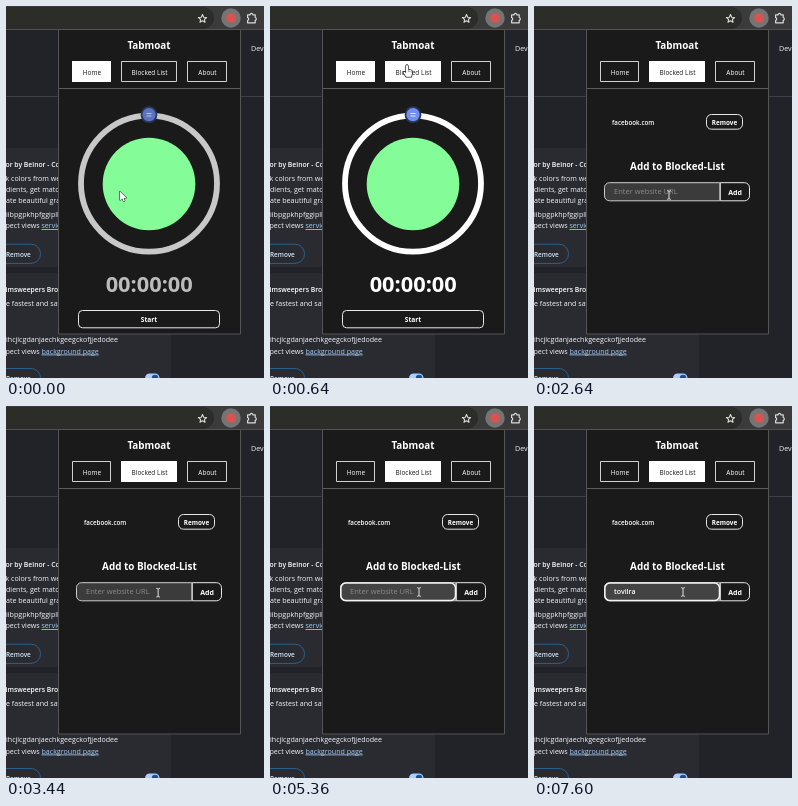
Write an HTML page with a canvas that moves like this. It is 258 by 372 pixels and loops after 8 s.

```html
<!DOCTYPE html>
<html lang="en">
<head>
<meta charset="utf-8">
<title>Site blocker popup</title>
<style>
html, body { margin: 0; width: 100%; height: 100%; overflow: hidden; background: #212329; }
canvas { display: block; width: 258px; height: 372px; }
</style>
</head>
<body>
<canvas id="stage"></canvas>
<script>
const W = 258, H = 372, LOOP = 8000;
const canvas = document.getElementById('stage');
const ctx = canvas.getContext('2d');
const dpr = window.devicePixelRatio || 1;
canvas.width = W * dpr;
canvas.height = H * dpr;

const FONT = '"Open Sans", "Noto Sans", sans-serif';
const INK = '#1a1a1a', WHITE = '#ffffff', EDGE = '#e8e8e8';
const PAGE_TEXT = '#f4f5f7', LINK = '#a4cbfb', PILL_EDGE = '#2b608c';

const PAGE_SWITCH = 1440, FOCUS = 3840;
const TYPED = 'tovilra';
const KEY_TIMES = [5840, 6000, 6160, 6800, 6960, 7120, 7360];

// Pointer path: time, x, y
const PATH = [
  [0, 114, 185], [640, 137, 59], [1920, 137, 59], [2640, 135, 189], [2800, 135, 190],
  [3200, 158, 188], [3600, 149, 186], [LOOP, 149, 186]
];

const clamp = v => Math.max(0, Math.min(1, v));
const ramp = (t, a, b) => clamp((t - a) / (b - a));
const ease = p => p * p * (3 - 2 * p);

function text(str, x, y, size, weight = 400, color = WHITE, align = 'left') {
  ctx.font = `${weight} ${size}px ${FONT}`;
  ctx.fillStyle = color;
  ctx.textAlign = align;
  ctx.fillText(str, x, y);
}

function pageText(str, y, x = 0) {
  text(str, x, y, 7.1, 500, PAGE_TEXT);
}

function rect(x, y, w, h, color) {
  ctx.fillStyle = color;
  ctx.fillRect(x, y, w, h);
}

function box(x, y, w, h, r, fill, stroke, line = 1) {
  ctx.beginPath();
  ctx.roundRect(x, y, w, h, r);
  if (fill) { ctx.fillStyle = fill; ctx.fill(); }
  if (stroke) { ctx.strokeStyle = stroke; ctx.lineWidth = line; ctx.stroke(); }
}

function disc(x, y, r, color) {
  ctx.beginPath();
  ctx.arc(x, y, r, 0, Math.PI * 2);
  ctx.fillStyle = color;
  ctx.fill();
}

function faded(alpha, draw) {
  ctx.save();
  ctx.globalAlpha *= alpha;
  draw();
  ctx.restore();
}

function shape(d, x, y, fill, stroke, line = 1) {
  const path = new Path2D(d);
  ctx.save();
  ctx.translate(x, y);
  ctx.lineJoin = 'round';
  if (stroke) { ctx.strokeStyle = stroke; ctx.lineWidth = line; ctx.stroke(path); }
  if (fill) { ctx.fillStyle = fill; ctx.fill(path); }
  ctx.restore();
}

function drawToolbar() {
  rect(0, 0, W, 23, '#3b3b3b');
  rect(0, 23, W, 1, '#505050');
  box(-20, 1, 228, 22, 11, '#2c2d29');
  ctx.beginPath();
  for (let i = 0; i < 10; i++) {
    const a = -Math.PI / 2 + i * Math.PI / 5, r = i % 2 ? 2 : 4.3;
    ctx.lineTo(196.5 + r * Math.cos(a), 12.8 + r * Math.sin(a));
  }
  ctx.closePath();
  ctx.lineJoin = 'round';
  ctx.lineWidth = 1.1;
  ctx.strokeStyle = '#dcdcdc';
  ctx.stroke();
  disc(225, 12, 9.7, '#747474');
  disc(225, 12, 4.8, '#d9534f');
  shape('M-4 -3H-1.5A1.4 1.4 0 0 1 1.3 -3H3.6V-.3A1.5 1.5 0 0 1 3.6 2.6V5H-4V2.7A1.5 1.5 0 0 0 -4 -.2Z',
    245.6, 11.8, null, '#dcdcdc', 1.2);
}

function pill(y) {
  box(-30, y, 64.5, 19.2, 9.6, null, PILL_EDGE);
  text('Remove', 0, y + 12.3, 6.4, 600, '#d3e6fc');
}

function linkRow(label, y) {
  pageText('pect views ', y, -0.5);
  const x = ctx.measureText('pect views ').width - 0.5;
  text(label, x, y, 7.1, 500, LINK);
  rect(x, y + 1, ctx.measureText(label).width, 0.8, LINK);
}

function drawPage() {
  rect(0, 23, W, H, '#212329');
  rect(0, 90, W, 1, '#3c3f45');
  pageText('Developer mode', 45.3, 245);

  box(-20, 142, 185, 119, 4, '#2a2b30');
  box(-20, 267, 185, 130, 4, '#2a2b30');

  text('or by Belnor - Color picker', -0.5, 161, 6.8, 600, WHITE);
  pageText('k colors from websites', 174.5, -0.5);
  pageText('dients, get matching', 186);
  pageText('ate beautiful gradients', 197);
  pageText('iibpgpkhpfggiplhk', 210.5);
  linkRow('service worker', 222);
  pill(238.2);

  text('imsweepers Browser', -0.5, 286, 6.8, 600, WHITE);
  pageText('e fastest and safest', 299.5);
  pageText('ihcjicgdanjaechkgeegckofjjedodee', 336);
  linkRow('background page', 347.5);
  pill(362.5);
  box(139, 367.5, 14.5, 9, 4.5, '#a8cdff');
  disc(149, 372, 3.2, '#1a4f94');
}

function navButton(label, x, w, lit) {
  box(x + 0.5, 55.5, w - 1, 20, 0, INK, '#d0d0d0');
  const mid = x + w / 2 + 0.5;
  if (lit < 1) text(label, mid, 69, 6.5, 500, WHITE, 'center');
  if (lit > 0) faded(lit, () => {
    rect(x, 55, w, 21, WHITE);
    text(label, mid, 69, 6.5, 400, INK, 'center');
  });
}

function drawTimer(t) {
  const fade = ramp(t, 0, 560);
  faded(0.76 + 0.24 * fade, () => {
    ctx.beginPath();
    ctx.arc(143, 177.6, 68, 0, Math.PI * 2);
    ctx.lineWidth = 5.8;
    ctx.strokeStyle = WHITE;
    ctx.stroke();
  });
  faded(0.71 + 0.29 * fade, () => text('00:00:00', 143.2, 285.8, 21.8, 700, WHITE, 'center'));
  disc(143, 108.7, 8.4, '#29385a');
  faded(0.68 + 0.32 * fade, () => {
    disc(143, 108.7, 6.6, '#718ff0');
    rect(140.5, 107, 5, 1, '#e2e9ff');
    rect(140.5, 109.5, 5, 1, '#e2e9ff');
  });
  disc(143, 178, 46.3, '#84fd98');
  box(72.5, 304.5, 141, 17.3, 4, INK, EDGE);
  text('Start', 143, 315.8, 6.6, 700, WHITE, 'center');
}

function drawList(t) {
  text('facebook.com', 78, 118.7, 6.25, 600);
  box(172.5, 108.5, 36, 14.7, 5, INK, EDGE);
  text('Remove', 190.5, 118.8, 6.4, 700, WHITE, 'center');
  text('Add to Blocked-List', 143.4, 163.7, 9.9, 700, WHITE, 'center');

  const focus = ramp(t, FOCUS - 80, FOCUS + 160);
  box(186.3, 176.7, 29.2, 18.1, [0, 5, 5, 0], INK, EDGE);
  text('Add', 201, 189, 7, 700, WHITE, 'center');
  box(70.5, 176.7, 115.3, 18.1, [5, 0, 0, 5], '#3b3b3b', '#cccccc');
  if (focus) faded(focus, () => box(70.9, 177, 114.6, 17.6, 5, '#434343', '#f4f4f4', 1.5));

  const count = KEY_TIMES.filter(k => t >= k).length;
  if (count) text(TYPED.slice(0, count), 80, 188, 7, 600);
  else text('Enter website URL', 80, 188.2, 7.5, 400, '#8a8a8a');
}

function drawPopup(t) {
  const listOpen = t >= PAGE_SWITCH;
  box(52.5, 23.5, 182, 304.5, 0, INK, '#555555');
  text('Tabmoat', 143, 42.5, 9.9, 700, WHITE, 'center');
  navButton('Home', 66, 39, listOpen ? 0 : 1);
  navButton('Blocked List', 115, 56, ramp(t, 440, 640));
  navButton('About', 181, 40, 0);
  rect(53, 82, 182, 1, '#5c5c5c');
  if (listOpen) drawList(t);
  else drawTimer(t);
}

function pointerAt(t) {
  const i = PATH.findIndex(p => p[0] > t);
  const [t0, x0, y0] = PATH[i - 1], [t1, x1, y1] = PATH[i];
  const p = ease(ramp(t, t0, t1));
  return [x0 + (x1 - x0) * p, y0 + (y1 - y0) * p];
}

function drawPointer(t) {
  const [x, y] = pointerAt(t);
  const onInput = t >= PAGE_SWITCH && y > 176 && y < 195;
  const onHeading = t >= PAGE_SWITCH && y > 153 && y < 167;
  if (y > 55 && y < 76) {
    shape('M-1 .8Q0 -.8 1 .8V4.5L4.3 5.3Q5.2 5.7 5.2 7L4.4 11.8H-.8L-3.6 7.8Q-3.6 6.4 -2.3 6.8L-1 8Z', x, y, WHITE, '#111', 1.3);
    shape('M1.3 7V5.2M2.8 7.2V5.6M4.3 7.4V6.3', x, y, null, '#333', 0.5);
  } else if (onInput || onHeading) {
    shape('M-1.8 -4.3Q0 -4.3 0 -3.4Q0 -4.3 1.8 -4.3M0 -3.4V3.4M-1.8 4.3Q0 4.3 0 3.4Q0 4.3 1.8 4.3', x, y, null, '#f2f2f2', 0.9);
  } else {
    shape('M0 0V9.4L2.2 7.4L3.6 10.6L5 10L3.7 6.9H6.5Z', x, y, WHITE, '#111', 1);
  }
}

const start = performance.now();

function frame(now) {
  const t = Math.max(0, now - start) % LOOP;
  ctx.setTransform(dpr, 0, 0, dpr, 0, 0);
  drawPage();
  drawToolbar();
  drawPopup(t);
  drawPointer(t);
  requestAnimationFrame(frame);
}

frame(start);
</script>
</body>
</html>
```
